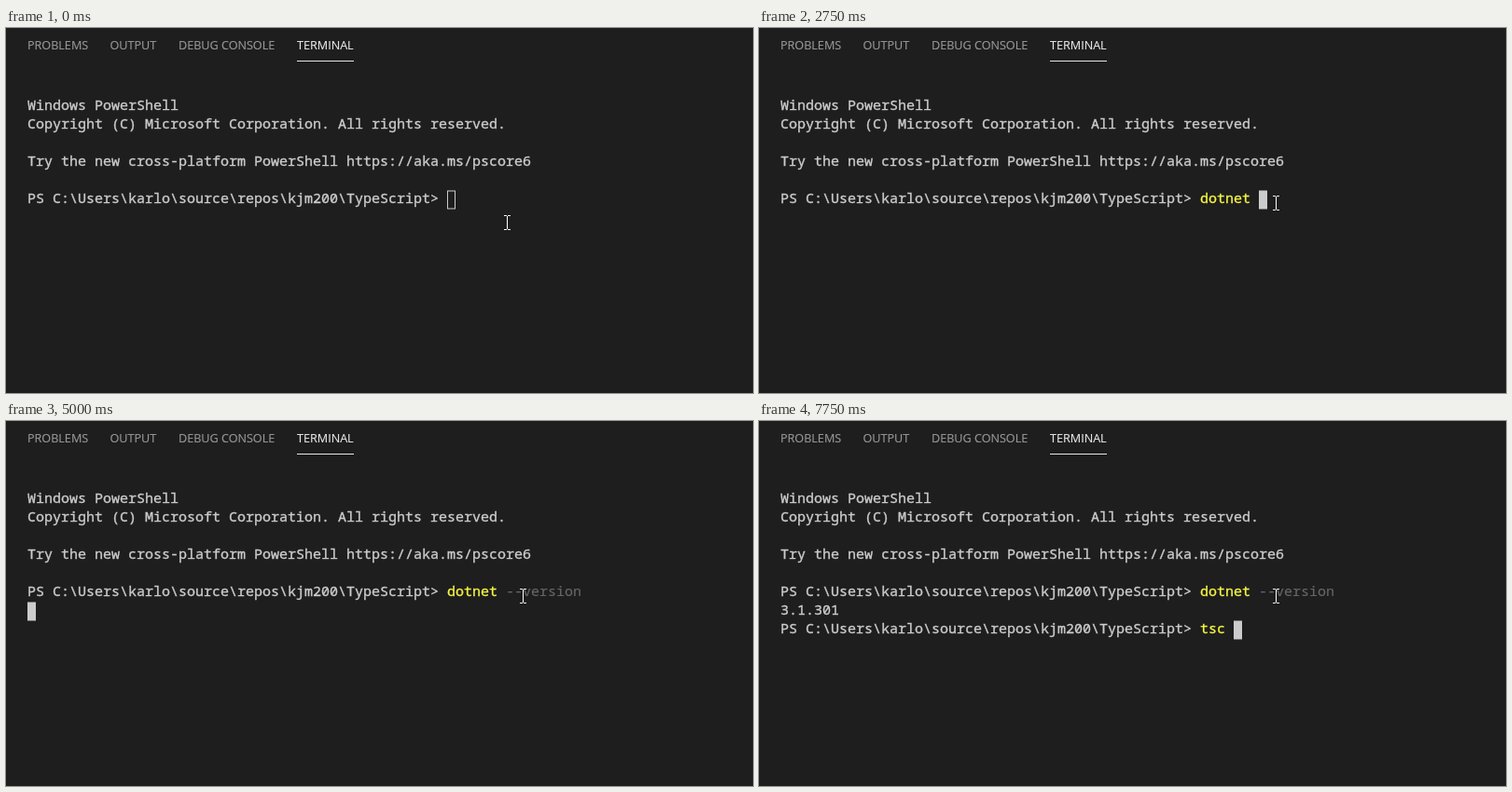
Write an HTML page that moves like this. It is 801 by 392 pixels and loops after 8 s.

```html
<!DOCTYPE html>
<html lang="en">
<head>
<meta charset="utf-8">
<title>Terminal</title>
<style>
  html, body { margin: 0; width: 100%; height: 100%; overflow: hidden; background: #1e1e1e; }
  svg { display: block; }
  text { fill: currentColor; stroke: currentColor; }
  .tabs { font: 12.6px "Open Sans", "Noto Sans", sans-serif; color: #979797; stroke-width: .15px; }
  .tabs .on { color: #e7e7e7; }
  .term { font: 15px "Noto Sans Mono", "DejaVu Sans Mono", monospace; color: #ccc; stroke-width: .35px; }
  .term .cmd { color: #f5f543; }
  .term .arg { color: #666; stroke-width: .15px; }
</style>
</head>
<body>
<svg width="801" height="392" viewBox="0 0 801 392">
  <rect width="801" height="392" fill="#1e1e1e"/>
  <g class="tabs">
    <text x="23" y="23">PROBLEMS</text>
    <text x="111.5" y="23">OUTPUT</text>
    <text x="185" y="23">DEBUG CONSOLE</text>
    <text class="on" x="312" y="23">TERMINAL</text>
    <rect x="312" y="35" width="61" height="1" fill="#e7e7e7"/>
  </g>
  <g class="term">
    <text x="23" y="88">Windows PowerShell</text>
    <text x="23" y="108">Copyright (C) Microsoft Corporation. All rights reserved.</text>
    <text x="23" y="148">Try the new cross-platform PowerShell https://aka.ms/pscore6</text>
    <text x="23" y="188">PS C:\Users\karlo\source\repos\kjm200\TypeScript&gt;</text>
    <text class="cmd" id="cmd" x="473" y="188"></text>
    <text class="arg" id="arg" x="536" y="188"></text>
    <text id="out" x="23" y="208">3.1.301</text>
    <text id="prompt" x="23" y="228">PS C:\Users\karlo\source\repos\kjm200\TypeScript&gt;</text>
    <text class="cmd" id="next" x="473" y="228"></text>
  </g>
  <rect id="caret" x=".5" y=".5" width="8" height="19" stroke="#ccc"/>
  <path id="mouse" fill="#fff" d="M0 0h3v1h1v-1h3v1h-3v14h3v1h-3v-1h-1v1h-3v-1h3v-14h-3z"/>
</svg>
<script>
const LOOP = 8000, CELL = 9, LINE = 20, LEFT = 23, TOP = 174.5, PROMPT = 50;
const FIRST = "dotnet --version", SECOND = "tsc ";
const $ = id => document.getElementById(id);

// [ms, characters typed on the first line]
const typing = [
  [0, 0], [1250, 1], [1500, 2], [1750, 3], [2000, 4], [2250, 5], [2500, 6], [2750, 7],
  [3000, 9], [3250, 10], [4000, 11], [4250, 12], [4500, 13], [4750, 15], [5000, 16]
];
// [ms, characters typed on the second line]
const retyping = [[0, 0], [7250, 2], [7500, 3], [7750, 4]];
// [ms, x, y]
const pointer = [[0, 534, 201], [250, 551, 180]];

const at = (steps, t) => steps.filter(s => s[0] <= t).pop();
const show = (el, on) => el.setAttribute("visibility", on ? "visible" : "hidden");
const move = (el, x, y) => el.setAttribute("transform", `translate(${x} ${y})`);
const write = (el, text) => { if (el.textContent !== text) el.textContent = text; };

function caretCell(t, typed, retyped) {
  if (t < 5000) return [PROMPT + typed, 0];
  if (t < 5250) return [0, 1];
  if (t < 5500) return [0, 2];
  return [PROMPT + retyped, 2];
}

function draw(t) {
  const typed = at(typing, t)[1], retyped = at(retyping, t)[1];
  const [col, row] = caretCell(t, typed, retyped);
  const [, px, py] = at(pointer, t);

  write($("cmd"), FIRST.slice(0, Math.min(typed, 6)));
  write($("arg"), FIRST.slice(7, Math.max(typed, 7)));
  write($("next"), SECOND.slice(0, retyped));
  show($("out"), t >= 5250);
  show($("prompt"), t >= 5500);

  move($("caret"), LEFT + col * CELL, TOP + row * LINE);
  $("caret").setAttribute("fill", t < 500 ? "none" : "#ccc");
  move($("mouse"), px, py);
}

function tick() {
  draw(performance.now() % LOOP);
  requestAnimationFrame(tick);
}
tick();
</script>
</body>
</html>
```
